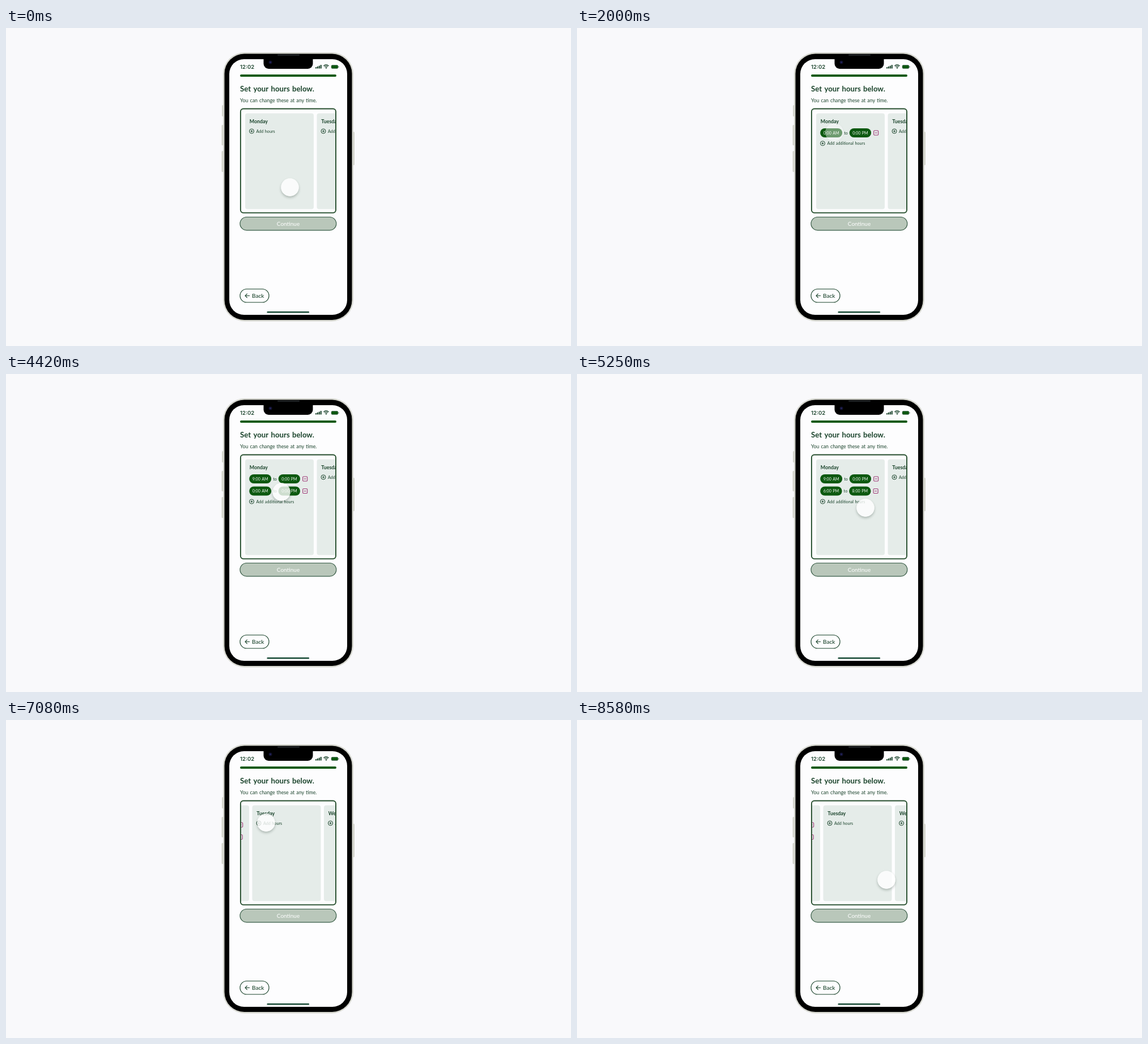
These frames come from a looping animation (997 px wide and 561 px high, 8.66 s). An HTML page with a canvas:

```html
<!DOCTYPE html>
<html lang="en">
<head>
<meta charset="utf-8">
<title>Set your hours</title>
<style>
  html, body { margin: 0; width: 100%; height: 100%; overflow: hidden; background: #f9f9fb; }
  canvas { display: block; }
</style>
</head>
<body>
<canvas id="stage" width="997" height="561"></canvas>
<script>
const ctx = document.getElementById('stage').getContext('2d');
const LOOP = 8660;
const STEPS = 104;
const INK = '#1b442c';
const GREEN = '#0d5910';
const PINK = '#a03a78';
const METAL = '#d5d6ce';
const SCREEN = '#fdfdfe';
const CARD_PITCH = 126.5;
const ROW_PITCH = 21.5;
const DAYS = ['Monday', 'Tuesday', 'Wednesday'];

const SWIPE = { start: 5830, length: 960, distance: -114 };
const HOME = { x: 501, y: 281 };
const MOVES = [
  { start: 0, length: 700, x: 454, y: 184 },
  { start: 2880, length: 370, x: 486, y: 208 },
  { start: 4700, length: 550, x: 509, y: 236 },
  { start: 5250, length: 580, x: 552, y: 222 },
  { ...SWIPE, x: 552 + SWIPE.distance, y: 222 },
  { start: 6790, length: 290, x: 459, y: 181 },
  { start: 7660, length: 920, x: 546, y: 282 }
];
const TAPS = [1000, 2050, 4100];

const mix = (a, b, p) => a + (b - a) * p;
const clamp = v => Math.min(1, Math.max(0, v));

function progress(t, { start, length }) {
  const p = clamp((t - start) / length);
  return p * p * (3 - 2 * p);
}

const reveal = (t, start) => progress(t, { start, length: 300 });

function pointerAt(t) {
  return MOVES.reduce((pos, move) => {
    const p = progress(t, move);
    return { x: mix(pos.x, move.x, p), y: mix(pos.y, move.y, p) };
  }, HOME);
}

const pressAt = t => Math.max(...TAPS.map(tap => clamp(2 - Math.abs(t - tap) / 120)));

function box(x, y, w, h, r, fill, stroke, line = 1) {
  ctx.beginPath();
  ctx.roundRect(x, y, w, h, r);
  if (fill) { ctx.fillStyle = fill; ctx.fill(); }
  if (stroke) { ctx.strokeStyle = stroke; ctx.lineWidth = line; ctx.stroke(); }
}

function arc(x, y, r, from = 0, to = Math.PI * 2) {
  ctx.beginPath();
  ctx.arc(x, y, r, from, to);
}

function disc(x, y, r, fill) {
  arc(x, y, r);
  ctx.fillStyle = fill;
  ctx.fill();
}

function ring(x, y, r, width, from, to) {
  arc(x, y, r, from, to);
  ctx.strokeStyle = INK;
  ctx.lineWidth = width;
  ctx.stroke();
}

function line(color, width, x, y, ...rest) {
  ctx.strokeStyle = color;
  ctx.lineWidth = width;
  ctx.beginPath();
  ctx.moveTo(x, y);
  for (let i = 0; i < rest.length; i += 2) ctx.lineTo(rest[i], rest[i + 1]);
  ctx.stroke();
}

function setFont(size, weight = 400, family = 'Lato') {
  ctx.font = `${weight} ${size}px ${family}, sans-serif`;
  ctx.wordSpacing = `${size * 0.09}px`;
}

// y is the middle of the capitals
function text(str, x, y, size, { weight, color = INK, align = 'left', family } = {}) {
  setFont(size, weight, family);
  ctx.textAlign = align;
  ctx.fillStyle = color;
  ctx.fillText(str, x, y + size * 0.36);
}

function phone() {
  const button = (x, y, h) => box(x, y, 4, h, 1.5, METAL);
  button(381, 136, 20);
  button(380.5, 171, 36);
  button(380.5, 217, 37);
  button(611, 183, 59);
  box(383, 43, 230, 474.5, 38, METAL);
  box(385.5, 45.5, 225, 469.5, 35, '#000');
  box(394, 55, 208, 451, 26, SCREEN);
  box(454.5, 50, 87, 22, [0, 0, 9, 9], '#000');
  box(479, 46.8, 39, 2, 1, '#24282b');
  disc(466.5, 60.5, 3, '#10102c');
  disc(466.5, 60.5, 1.2, '#29296a');
}

function statusBar() {
  text('12:02', 413, 68.5, 9.5, { weight: 600, family: 'Inter' });
  for (let i = 0; i < 4; i++) {
    const h = 2.5 + i * 1.3;
    box(546 + i * 2.9, 71.5 - h, 2.1, h, 0.6, INK);
  }
  for (const r of [6.2, 3.9]) ring(565, 71.2, r, 1.3, -Math.PI * 0.76, -Math.PI * 0.24);
  disc(565, 70.3, 1.2, INK);
  box(574.2, 65.7, 11.5, 5.6, 1.4, GREEN, INK, 0.7);
  box(586.5, 67.4, 1, 2.2, 0.5, INK);
}

function addLink(x, y, label) {
  ring(x + 4, y, 4, 1);
  line(INK, 1, x + 2, y, x + 6, y);
  line(INK, 1, x + 4, y - 2, x + 4, y + 2);
  text(label, x + 12, y, 7.2);
}

// returns the x of the pill's right end
function pill(x, y, label) {
  setFont(7.1);
  const width = ctx.measureText(label).width + 11;
  box(x, y - 8, width, 16, 8, GREEN);
  text(label, x + 5.5, y, 7.1, { color: '#eef6ee' });
  return x + width;
}

function hoursRow(x, y, from, to, alpha) {
  if (!alpha) return;
  ctx.globalAlpha = alpha;
  const fromEnd = pill(x, y, from);
  text('to', fromEnd + 3, y, 7.2);
  const toEnd = pill(fromEnd + 12.5, y, to);
  box(toEnd + 4.6, y - 4, 8, 8, 1.2, null, PINK, 1.1);
  line(PINK, 1.1, toEnd + 6.6, y, toEnd + 10.6, y);
  ctx.globalAlpha = 1;
}

function cards(t) {
  const scroll = SWIPE.distance * progress(t, SWIPE);
  const first = reveal(t, 800);
  const second = reveal(t, 4080);
  const frame = [413.9, 142.5, 168.1, 183.6, 5];

  ctx.save();
  ctx.beginPath();
  ctx.roundRect(...frame);
  ctx.clip();
  DAYS.forEach((day, i) => {
    const x = 422 + i * CARD_PITCH + scroll;
    box(x, 150.5, 121, 169, 4, '#e5ece9');
    text(day, x + 7.8, 164.5, 8.8, { weight: 700 });
    if (i > 0) {
      addLink(x + 7.5, 182, 'Add hours');
      return;
    }
    hoursRow(x + 7.2, 185, t < 2080 ? '0:00 AM' : '9:00 AM', '0:00 PM', first);
    hoursRow(x + 7.2, 185 + ROW_PITCH,
      t < 4580 ? '0:00 AM' : '6:00 PM', t < 4830 ? '0:00 PM' : '8:00 PM', second);
    addLink(x + 7.5, 182 + ROW_PITCH * (first + second),
      t < 880 ? 'Add hours' : 'Add additional hours');
  });
  ctx.restore();
  box(...frame, null, '#244d2c', 1.9);
}

function pointer(t) {
  const { x, y } = pointerAt(t);
  const press = pressAt(t);
  const radius = 15.7;

  // keep the shadow outside the translucent disc
  ctx.save();
  ctx.beginPath();
  ctx.rect(0, 0, 997, 561);
  ctx.arc(x, y, radius, 0, Math.PI * 2);
  ctx.clip('evenodd');
  ctx.shadowColor = `rgba(40, 60, 50, ${mix(0.3, 0.05, press)})`;
  ctx.shadowBlur = 4;
  ctx.shadowOffsetY = mix(2.5, 0.5, press);
  disc(x, y, radius, '#fff');
  ctx.restore();
  disc(x, y, radius, `rgba(255, 255, 255, ${mix(0.8, 0.4, press)})`);
}

function draw(t) {
  ctx.fillStyle = '#f9f9fb';
  ctx.fillRect(0, 0, 997, 561);
  phone();
  statusBar();
  box(413, 82, 170, 4, 2, GREEN);
  text('Set your hours below.', 413, 107.3, 13.2, { weight: 700 });
  text('You can change these at any time.', 413, 128.3, 8.8);
  cards(t);
  box(413, 333.5, 169.8, 23.3, 11.6, '#b9c7ba', '#355a44', 1.2);
  text('Continue', 498, 345.5, 10, { color: '#fff', align: 'center' });
  box(413, 460.5, 51, 23.5, 11.75, SCREEN, INK, 1.2);
  line(INK, 1.1, 430, 472.3, 422, 472.3);
  line(INK, 1.1, 425.7, 468.6, 422, 472.3, 425.7, 476);
  text('Back', 434, 472.5, 10, { weight: 500 });
  box(460.5, 500, 74.5, 2.6, 1.3, '#174a35');
  pointer(t);
}

const begin = performance.now();
function tick() {
  const t = (performance.now() - begin) % LOOP;
  const step = Math.floor((t + 5) * STEPS / LOOP) % STEPS;
  draw(step * LOOP / STEPS);
  requestAnimationFrame(tick);
}
tick();
</script>
</body>
</html>
```
